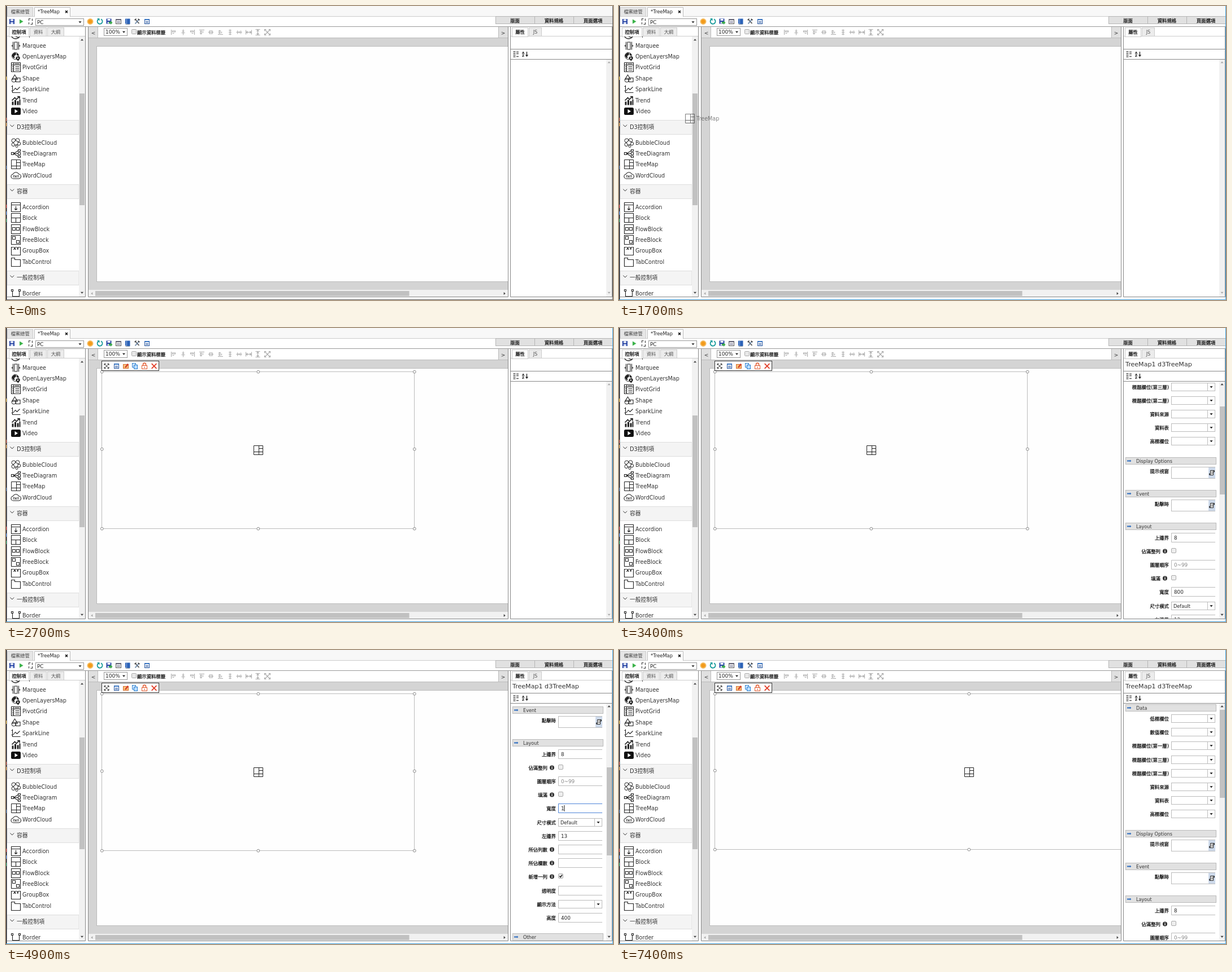
An HTML page that plays this animation: 1074 px wide and 521 px high, repeating every 8 s.

```html
<!DOCTYPE html>
<html lang="zh-TW">
<head>
<meta charset="utf-8">
<title>TreeMap</title>
<style>
html, body { margin: 0; width: 100%; height: 100%; overflow: hidden; background: #fff; }
svg { display: block; width: 1074px; height: 521px; }
text { font-family: "DejaVu Sans", "Noto Sans CJK TC", "Noto Sans CJK", sans-serif; white-space: pre; }
.firm { stroke: #111; stroke-width: .25px; }
</style>
</head>
<body>
<svg id="stage" viewBox="0 0 1074 521"></svg>
<script>
const INK = '#333', BLUE = '#1d4f9c';
const rect = (x, y, w, h, fill = 'none', stroke = 'none', extra = '') =>
  `<rect x="${x}" y="${y}" width="${w}" height="${h}" fill="${fill}" stroke="${stroke}" ${extra}/>`;
const path = (d, stroke = INK, fill = 'none', width = 1) =>
  `<path d="${d}" stroke="${stroke}" fill="${fill}" stroke-width="${width}"/>`;
const solid = (d, fill = '#222') => path(d, 'none', fill);
const dot = (x, y, r, fill = 'none', stroke = 'none') =>
  `<circle cx="${x}" cy="${y}" r="${r}" fill="${fill}" stroke="${stroke}"/>`;
const text = (x, y, str, size = 8.3, fill = '#222', extra = '') =>
  `<text x="${x}" y="${y}" font-size="${size}" fill="${fill}" ${extra}>${str}</text>`;
const group = (body, extra = '') => `<g ${extra}>${body}</g>`;
const at = (x, y, body) => group(body, `transform="translate(${x} ${y})"`);
const hidden = (id, body) => group(body, `id="${id}" visibility="hidden"`);
const clip = (id, x, y, w, h) => `<clipPath id="${id}">${rect(x, y, w, h, '#000')}</clipPath>`;
const arrow = (x, y, dir, fill = '#444', s = 2.6) => at(x, y,
  `<path d="M${-s} ${-s / 2}H${s}L0 ${s / 2 + .4}z" fill="${fill}" transform="rotate(${dir})"/>`);
const MIDDLE = 'text-anchor="middle"', END = 'text-anchor="end"', FIRM = ' class="firm"';

// Palette icons, centred on 0,0 in a 16 px box
const p = (d, fill = 'none', w = 1.1) => path(d, '#222', fill, w);
const icons = {
  Marquee: p('M-2.5 -6.5h5v13h-5zM-5 -7v14M5 -7v14') + solid('M-8 0l2-2v4zM8 0l-2-2v4z'),
  OpenLayersMap: dot(-1, -1, 6, '#fff', '#222') +
    solid('M-6 -4l4-3 3 2-2 3-2 1 1 3-2 1-3-4zM2 -6l3 3-2 2-2-2zM3 0a3 3 0 0 1 4 4l-3 4-4-4a3 3 0 0 1 3-4z') + dot(3.5, 3, 1.2, '#fff'),
  PivotGrid: p('M-8 -8H8V8H-8zM-8 -4H8M-4 -8V8') + p('M-1 -1h7M-1 2h7M-1 5h7M-6.5 -1h2M-6.5 2h2M-6.5 5h2M-2 -6h8'),
  Shape: p('M-2 -6.5L3 1.5H-7zM0 -1h7.5v7h-7.5z') + dot(-3.8, 3, 3.5, 'none', '#222'),
  SparkLine: p('M-6 -7V6H8M-8 -5h2M-8 3h2M-5 3l4-5 3 3 5-5'),
  Trend: solid('M-7 2h3v6h-3zM-2.5 -1h3v9h-3zM2 1h3v7h-3zM6 -2h2v10h-2z') + p('M-7 0l5-5 3 3 5-5M2.5 -7h4v4', 'none', 1.7),
  Video: rect(-8.5, -6.5, 17, 13, '#111', 'none', 'rx="2.5"') + solid('M-2 -3.5l5.5 3.5-5.5 3.5z', '#fff'),
  BubbleCloud: dot(-4, -4, 3.5, '#fff', '#222') + dot(3, -4.5, 3.3, '#fff', '#222') + dot(-4.5, 3, 3, '#fff', '#222') +
    dot(5.5, 1.5, 2.8, '#fff', '#222') + dot(0, 0, 3.8, '#fff', '#222') + dot(1.5, 6, 2, '#fff', '#222'),
  TreeDiagram: p('M-4 0L4 -5M-4 0H4M-4 0L4 5') + p('M-8 -2h4v4h-4zM4 -7h4v3h-4zM4 -2h4v4h-4zM4 4h4v3h-4z', '#fff'),
  TreeMap: p('M-8 -8H8V8H-8zM1 -8V8M-8 3H8M1 -3H8', 'none', 1),
  WordCloud: p('M-4 5.5a4 4 0 0 1-1-8a5.5 5.5 0 0 1 10 0a4 4 0 0 1 0 8z') + text(0, 3.4, 'TXT', 5, '#111', MIDDLE + ' font-weight="bold"'),
  Accordion: p('M-8 -8H8V8H-8zM-8 -4H8M0 -2v7M-2.5 2.5L0 5l2.5-2.5'),
  Block: p('M-8 -8H8V8H-8zM-8 0H8M0 0v8'),
  FlowBlock: p('M-8 -8H8V8H-8zM-6 -3h5v5h-5zM1 -3h5v5H1z'),
  FreeBlock: p('M-8 -8H8V8H-8zM-6 -6h5v5h-5zM1 1h5v5H1z'),
  GroupBox: p('M-5 -6h-3V8H8V-6H6') + text(.5, -2, 'XY', 7, '#111', MIDDLE + ' font-weight="bold"'),
  TabControl: p('M-8 -7h6v3H8V8H-8z'),
  Border: p('M-6 -4V5H6V-4M-8 -7h3v3h-3zM5 -7h3v3h-3z', '#fff'),
};

const item = (name, y) => at(17.5, Math.floor(y) + .5, icons[name]) + text(29, y + 3.5, name, 9.65, INK);
const items = (names, y) => names.split(' ').map((n, i) => item(n, y + i * 19.4)).join('');
const section = (name, y) => rect(2, y + .5, 127, 25, '#f4f4f4', '#ddd') +
  path(`M7.5 ${y + 8.5}l3.3 3.5 3.3-3.5`) + text(19, y + 15.8, name, 9.8, INK);
const tab = (x, y, w, h, label, active) =>
  rect(x + .5, y + .5, w, h, active ? '#fff' : '#ececec', '#ccc') +
  text(x + w / 2 + .5, y + 11, label, 8.3, active ? '#111' : '#555', MIDDLE + (active ? FIRM : ''));
const floppy = rect(-4.5, -4.5, 9, 9, '#2946a5') + rect(-2.5, -4, 5, 3, '#fff') + rect(-2.5, 1, 5, 3.5, '#cfd8f0');
const listIcon = rect(-4, -4, 8, 8, '#fff', BLUE) + rect(-4, -4.5, 8, 2, '#3b78c4') + path('M-2.5 0h5M-2.5 2h5', BLUE, 'none', .9);

function frameParts() {
  const specks = [[125, '#eb3'], [198, '#c43'], [207, '#e93'], [283, '#36a'], [352, '#d33'], [364, '#48e'], [377, '#2a6']];
  return rect(0, 0, 1.5, 521, '#15151d') + specks.map(([y, c]) => rect(0, y, 1, 6, c)).join('') +
    rect(2, 0, 1072, 18, '#f8f8f8') + path('M2 18.5H1074', '#ccc') +
    rect(2.5, 2.5, 45, 16, '#e6e6e6', '#ccc') + text(8.5, 13, '檔案總管', 8.3, '#444') +
    path('M50.5 19V2.5H113.5V19', '#bbb', '#fff') + text(56, 13, '*TreeMap', 8.3) +
    path('M105 8.3l4 4M109 8.3l-4 4', '#111', 'none', 1.6) +
    path('M2 36.5H1074', '#999') +
    [['版面', 866], ['資料規格', 935], ['頁面選項', 1004]].map(([s, x]) =>
      rect(x + .5, 18.5, 69, 13, '#e1e1e1', '#b5b5b5') + text(x + 34.5, 28.6, s, 8.4, '#111', MIDDLE + FIRM)).join('');
}

function mainToolbar() {
  const rays = Array.from({ length: 8 }, (_, i) =>
    `<path d="M0 -5.5V5.5" stroke="#f0a020" stroke-width="1.3" transform="rotate(${i * 22.5})"/>`).join('');
  return at(10.5, 27.5, floppy) + solid('M24 23.5l6.5 4-6.5 4z', '#3cb34a') +
    path('M40.5 26v-3.5h3M46.5 29v3.5h-3M40.5 29v3.5M46.5 22.5v4', '#444', 'none', 1.2) +
    rect(52.5, 22.5, 85, 12, '#fff', '#999') + text(55, 32, 'PC', 8.8) + arrow(131, 28.5, 0, '#222') +
    at(149, 27.5, rays + dot(0, 0, 3.2, '#f39a1a')) +
    path('M163 24a4.5 4.5 0 1 0 5 -.8', '#159a9a', 'none', 1.8) + solid('M161 22h4.5v4.5z', '#159a9a') +
    at(182, 27, floppy) + solid('M182 28h3v-2l3.5 3.5-3.5 3.5v-2h-3z', '#3cab4a') +
    rect(194.5, 23.5, 9, 8, '#fff', '#555') + rect(194, 23, 10, 2.3, '#667') + rect(196, 27, 6, 3, '#aab') +
    solid('M211 23l2-1v10l-2-1zM213.5 22.5h6v9.5h-6z', '#2a62b8') + path('M211.5 32.3h7.5', '#789') +
    path('M228.5 23.5l7 7.5', '#555', 'none', 1.8) + path('M235.5 23.5l-7 8', '#6b87a8', 'none', 1.8) +
    path('M227.5 25l3-2.5M233.5 23l3 2', '#444', 'none', 1.6) + at(249.5, 27.5, listIcon);
}

function palette() {
  const list = path('M10 53a7 5 0 0 0 14 0M17 54l5 2', '#222', 'none', 1.3) + path('M41.5 52v4', '#444') +
    items('Marquee OpenLayersMap PivotGrid Shape SparkLine Trend Video', 70) +
    section('D3控制項', 202) + items('BubbleCloud TreeDiagram TreeMap WordCloud', 242) +
    section('容器', 316) + items('Accordion Block FlowBlock FreeBlock GroupBox TabControl', 356.2) +
    section('一般控制項', 469) + item('Border', 509);
  return path('M2 53.5H141', '#ccc') + tab(5, 38, 35, 16, '控制項', true) + tab(42, 38, 29, 15, '資料') + tab(73, 38, 29, 15, '大綱') +
    group(list, 'clip-path="url(#listClip)"') +
    rect(129, 54, 11, 461, '#f1f1f1') + rect(130, 155, 9, 198, '#c1c1c1') +
    arrow(134.5, 60, 180) + arrow(134.5, 508, 0) + path('M140.5 37V515.5H2', '#888');
}

function designer() {
  const grey = d => path(d, '#aaa', 'none', 1.1);
  const tools = ['M-4 -4.5v9M-2 -2.5h5v2h-5zM-2 2h3', 'M0 -5v10M-3 1h6M-2 -2h4', 'M4 -4.5v9M2 -2.5h-5v2h5zM2 2h-3',
    'M-4.5 -4h9M-2.5 -2v5h2v-5zM2 -2v3', 'M-4.5 0h9M-2.5 -2.5h5v5h-5z', 'M-4.5 4h9M-2.5 2v-5h2v5zM2 2v-3',
    'M0 -5v10M-2.5 -3.5h5M-2.5 0h5M-2.5 3.5h5', 'M-5 0h10M-3 -3v6M0 -2v4M3 -3v6', 'M-5 -4v8M5 -4v8M-4 0h8M-2 -2l-2 2 2 2M2 -2l2 2-2 2',
    'M-4 -5h8M-4 5h8M0 -4v8M-2 -2l2-2 2 2M-2 2l2 2 2-2', 'M-4.5 -4.5l9 9M4.5 -4.5l-9 9M-5 -2v-3h3M5 -2v-3h-3M-5 2v3h3M5 2v3h-3'];
  return rect(146, 57, 742, 446, '#d4d4d4') +
    rect(146, 37, 17, 20, '#e0e0e0') + text(154.5, 50.5, '&lt;', 9, INK, MIDDLE) +
    rect(871, 37, 17, 20, '#e0e0e0') + text(879.5, 50.5, '&gt;', 9, INK, MIDDLE) + path('M162.5 37v20M871.5 37v20M146 56.5H888', '#bbb') +
    rect(173.5, 39.5, 41, 13, '#fff', '#999') + text(176, 49.3, '100%', 9) + arrow(208.5, 46, 0, '#222') +
    rect(222.5, 41.5, 8, 8, '#e8e8e8', '#aaa', 'rx="1"') + text(232, 49.5, '顯示資料標籤', 8.35, '#222', FIRM) +
    tools.map((d, i) => at(Math.floor(296.5 + i * 16.6) + .5, 46.5, grey(d))).join('') +
    rect(160.5, 71.5, 740, 417, '#fefefe', '#bbb', 'id="page" clip-path="url(#pageClip)"');
}

function selectionTools() {
  return rect(169.5, 58.5, 101, 17, '#fff', INK) +
    at(178, 67.5, path('M-4 -1.5v-2.5h2.5M4 -1.5v-2.5h-2.5M-4 1.5v2.5h2.5M4 1.5v2.5h-2.5M-3.5 -3.5l7 7M3.5 -3.5l-7 7', '#222')) +
    at(195.5, 67.5, listIcon) +
    at(212, 67.5, rect(-4.5, -3, 9, 7, '#f6c27a', '#d8692a') + solid('M-2 2l5-6.5 2 1.5-5 6z', '#d33a2a')) +
    at(228, 67, rect(-4.5, -4.5, 6, 7, '#dcecff', '#2a7fd0') + rect(-1.5, -1.5, 6, 7, '#b8dcff', '#2a7fd0')) +
    at(245, 67.5, path('M-2.5 -.5v-2.5a2.5 2.5 0 0 1 5 0v2.5', '#e2572b', 'none', 1.4) + rect(-4.5, -1, 9, 6, '#fff', '#e2572b') + rect(-.6, 1, 1.2, 2.5, '#e2572b')) +
    at(262, 67.5, path('M-4.3 -4.3l8.6 8.6M4.3 -4.3l-8.6 8.6', '#e2402b', 'none', 1.9));
}

function centreFrame() {
  return rect(146, 503, 742, 12, '#f1f1f1') + rect(158, 505, 555.5, 9, '#c1c1c1') + arrow(152, 509.5, 90, '#aaa') + arrow(882, 509.5, -90) +
    path('M145.5 37V515.5H888.5V37', '#888');
}

// Property rows, centred on half pixels
const label = (s, y, right = 973) => text(right, y + 3, s, 8.4, '#111', END + FIRM);
const heading = (s, y) => rect(896.5, y - 6, 160, 12, '#e1e1e1', '#bbb') +
  solid(`M899 ${y - 1}h5v-1l2.5 2-2.5 2v-1h-5z`, '#2d6cc0') + text(915, y + 3.4, s, 8.15, INK);
const select = (s, y, value = '') => label(s, y) + rect(977.5, y - 7, 77, 14, '#fff', '#bbb') +
  path(`M1041.5 ${y - 7}v14`, '#bbb') + arrow(1048, y, 0, '#111') + text(981, y + 3, value, 8.2);
const script = (s, y) => label(s, y - .5) + rect(977.5, y - 8, 77, 20, '#fff', '#bbb') + rect(1043, y - 7.5, 12, 19, '#cdd9ea') +
  at(1049, y + 2, path('M-2.5 -4H4q-1.5 0-1.5 2.5V4H-4q1.5 0 1.5-2.5z', '#222', '#fff') + path('M-1 -1.5h2.5M-1 1h2.5M2.5 -1.5h2V-4M-2.5 1.5h-2V4', '#222'));
const box = (y, colour = '#bbb') => path(`M1055 ${y - 8}H977.5V${y + 8}H1055`, colour, '#fff');
const info = y => dot(966, y, 4, INK) + rect(965.4, y - .8, 1.3, 3.2, '#fff') + rect(965.4, y - 2.6, 1.3, 1.2, '#fff');
const input = (s, y, value = '', colour = '#222') => label(s, y) + box(y) + text(982, y + 3.2, value, 8.8, colour);
const infoInput = (s, y) => label(s, y, 958) + info(y) + box(y);
const check = (s, y, on) => label(s, y, 958) + info(y) + rect(977.5, y - 5, 8, 8, '#eee', '#aaa', 'rx="1.5"') +
  (on ? path(`M979.3 ${y - 1}l1.8 2 3-4`, '#222', 'none', 1.5) : '');
const editable = (id, s, y) => label(s, y) + box(y) + hidden(id + 'Focus', box(y, '#4d84d8')) +
  rect(982, y - 5.5, 17, 11, '#3390ff', 'none', `id="${id}Mark"`) +
  text(982, y + 3.2, '', 8.8, '#222', `id="${id}Text"`) + rect(982, y - 5.5, 1, 11, '#111', 'none', `id="${id}Caret"`);
const rows = (list, top, draw) => list.map((row, i) => draw(row, Math.floor(top + i * 24.2) + .5)).join('');

function properties() {
  const data = ['低標欄位', '數值欄位', '標題欄位(第一層)', '標題欄位(第三層)', '標題欄位(第二層)', '資料來源', '資料表', '高標欄位'];
  const layout = [
    y => input('上邊界', y, '8'), y => check('佔滿整列', y), y => input('圖層順序', y, '0~99', '#888'), y => check('填滿', y),
    y => editable('width', '寬度', y), y => select('尺寸模式', y, 'Default'), y => input('左邊界', y, '13'),
    y => infoInput('所佔列數', y), y => infoInput('所佔欄數', y), y => check('新增一列', y, true),
    y => input('透明度', y), y => select('顯示方法', y), y => editable('height', '高度', y)];
  return heading('Data', 102.5) + rows(data, 121.5, select) +
    heading('Display Options', 325.5) + script('提示視窗', 344.5) + heading('Event', 383.5) + script('點擊時', 402.5) +
    heading('Layout', 441.5) + rows(layout, 461, (row, y) => row(y)) + heading('Other', 785.5);
}

function propertyPanel() {
  return path('M893 53.5H1074', '#ccc') + tab(895, 38, 28, 16, '屬性', true) + tab(925, 38, 22, 15, 'JS') +
    path('M893 76.5H1074M893 94.5H1074', '#888') +
    path('M897.5 81h4M897.5 84h4M897.5 87h4M897.5 90h4M903 81.5h4M903 84.5h4M903 89.5h4', '#555', 'none', 1.6) +
    text(913, 84.8, 'A', 5.5, '#111', 'font-weight="bold"') + text(913, 90.3, 'Z', 5.5, '#111', 'font-weight="bold"') +
    path('M921.5 81v8M919.5 86.5l2 2.5 2-2.5', '#111', 'none', 1.2) +
    rect(1062, 95, 10, 420, '#f1f1f1') + arrow(1067, 100, 180, '#aaa') + arrow(1067, 508, 0, '#aaa') +
    hidden('props', text(896, 67.5, 'TreeMap1 d3TreeMap', 11.1, INK) +
      group(group(properties(), 'id="form"'), 'clip-path="url(#formClip)"') +
      rect(1063, 106, 9, 156, '#c1c1c1', 'none', 'id="thumb"') + arrow(1067, 100, 180) + arrow(1067, 508, 0)) +
    path('M892.5 37V515.5H1072.5V37', '#888');
}

document.getElementById('stage').innerHTML =
  `<defs>${clip('listClip', 2, 54, 127, 461)}${clip('formClip', 894, 95, 167, 419.5)}${clip('pageClip', 146, 58, 742, 445)}</defs>` +
  rect(0, 0, 1074, 521, '#fff') + frameParts() + mainToolbar() + palette() + designer() +
  hidden('widget', group('', 'id="outline" clip-path="url(#pageClip)"') + selectionTools()) +
  centreFrame() + propertyPanel() +
  `<path id="edge" d="M0 520.5H1073.5V0" fill="none"/>` +
  hidden('ghost', item('TreeMap', 0));

const $ = id => document.getElementById(id);
const show = (id, on) => $(id).setAttribute('visibility', on ? 'visible' : 'hidden');
const set = (id, attrs) => { for (const k in attrs) $(id).setAttribute(k, attrs[k]); };
const latest = (t, steps) => steps.filter(s => s[0] <= t).pop()[1];
const within = (t, a, b) => t >= a && t < b;

function outline(width, bottom) {
  const left = 169.5, top = 77.5, right = left + width, mid = left + width / 2, middle = (top + bottom) / 2 - 2;
  const spots = [[left, top], [mid, top], [right, top], [left, middle], [right, middle], [left, bottom], [mid, bottom], [right, bottom]];
  return rect(left, top, width, bottom - top, 'none', '#bbb') +
    spots.map(([x, y]) => dot(x + .3, y + .2, 2.4, '#fff', '#888')).join('') + at(Math.floor(mid) + .5, 216.5, icons.TreeMap);
}

function drawField(id, t, focus, blur, caretOff, values) {
  const value = latest(t, values), typed = values[1][0];
  const marked = within(t, focus + 100, typed);
  show(id + 'Focus', within(t, focus, blur));
  set(id + 'Mark', { visibility: marked ? 'inherit' : 'hidden' });
  set(id + 'Text', { fill: marked ? '#fff' : '#222' });
  $(id + 'Text').textContent = value;
  set(id + 'Caret', { x: 981.8 + 5.6 * value.length, visibility: within(t, focus, caretOff) && !marked ? 'inherit' : 'hidden' });
}

let outlined = '';
function draw(t) {
  set('edge', { stroke: t < 1400 ? '#555' : '#3c9ddb' });

  const left = 1 - Math.min(1, Math.max(0, (Math.floor(t / 100) * 100 - 1600) / 1000));
  const ghostX = Math.round(170 - 66 * left * left), ghostY = Math.round(86 + 140 * left * left);
  show('ghost', within(t, 1600, 2700));
  set('ghost', { opacity: .6, transform: `translate(${ghostX - 9} ${ghostY})` });
  const over = within(t, 1900, 2700);
  set('page', { fill: over ? '#ffcccc' : '#fefefe', stroke: over ? '#d99' : '#bbb', 'stroke-dasharray': over ? '2 1' : 'none' });

  show('widget', t >= 2700);
  const shape = outline(...(t < 6100 ? [553, 355.5] : [899, 353.5]));
  if (shape !== outlined) $('outline').innerHTML = outlined = shape;

  const scroll = latest(t, [[0, 0], [3400, 90], [3500, 184], [3600, 277], [7200, 187], [7300, 93], [7400, 0]]);
  show('props', t >= 3000);
  set('form', { transform: `translate(0 ${-scroll})` });
  set('thumb', { y: 106 + Math.round(scroll * .368) });
  drawField('width', t, 4300, 6100, 5900, [[0, '800'], [4900, '1'], [5100, '13'], [5300, '130'], [5500, '1300']]);
  drawField('height', t, 6100, 8000, 8000, [[0, '400'], [6500, '6'], [6700, '60'], [6900, '600']]);
}

const start = performance.now();
function tick() {
  draw((performance.now() - start) % 8000);
  requestAnimationFrame(tick);
}
tick();
</script>
</body>
</html>
```
